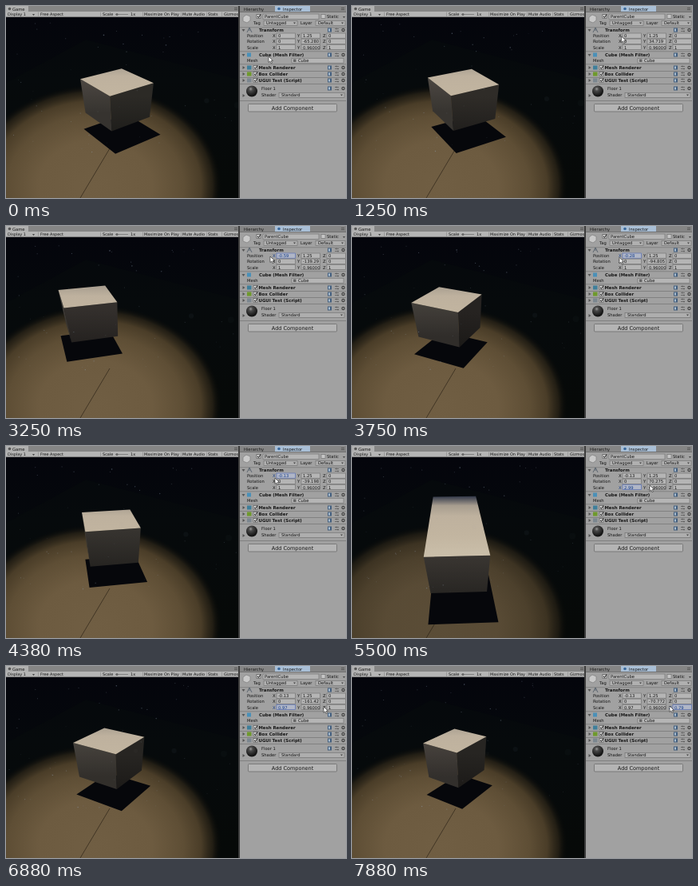
An HTML page with a canvas for the animation above (8000 ms loop, 426 by 240 pixels).

```html
<!DOCTYPE html>
<html lang="en">
<head>
<meta charset="utf-8">
<title>Cube inspector</title>
<style>
html, body { margin: 0; width: 100%; height: 100%; overflow: hidden; background: #05070b; }
canvas, svg { position: absolute; left: 0; top: 0; width: 426px; height: 240px; display: block; }
text { font-family: "DejaVu Sans", sans-serif; white-space: pre; }
</style>
</head>
<body>
<canvas id="view" width="426" height="240"></canvas>
<svg id="ui" viewBox="0 0 426 240"></svg>
<script>
const LOOP = 8000, STEP = 125;
const ctx = document.getElementById('view').getContext('2d');
const ui = document.getElementById('ui');

// Piecewise linear tracks: [time, value]
const tracks = {
  axis: [[0, 37], [1250, -60], [3250, -254], [4375, -350], [5500, -447], [6875, -573], [7875, -665], [8000, -676]],
  yaw: [[0, -65.28], [1250, 34.719], [3250, 220.71], [4375, 320.802], [5500, 430.275], [6875, 558.58], [7875, 649.228], [8000, 660.5]],
  pos: [[1500, 0], [3250, -.59], [4000, -.13]],
  sx: [[4625, 1], [5500, 2.99], [6250, .97]],
  sz: [[7000, 1], [7875, .79]],
  curX: [[0, 329], [500, 329], [1125, 340], [1500, 333], [3250, 331], [4000, 337], [4375, 337], [4625, 334], [5500, 373], [6250, 352], [6750, 398], [7875, 398]],
  curY: [[0, 63], [500, 63], [1125, 38], [3250, 38], [4000, 40], [4375, 40], [4625, 50], [5500, 49], [6250, 49], [6750, 51], [7875, 50]]
};

function at(name, t) {
  const keys = tracks[name];
  if (t <= keys[0][0]) return keys[0][1];
  for (let i = 1; i < keys.length; i++) {
    const [t0, a] = keys[i - 1], [t1, b] = keys[i];
    if (t <= t1) return a + (b - a) * (t - t0) / (t1 - t0);
  }
  return keys[keys.length - 1][1];
}

function seeded(seed) {
  return () => (seed = (seed * 16807) % 2147483647) / 2147483647;
}

// Camera: depth below the eye, sideways and forward distance to screen
const UNIT = .365, TOP = 1, BASE = 1.44, FLOOR = 1.796;
const COS = .778, SIN = .628;
function project([x, z], drop) {
  const depth = z * COS + drop * SIN;
  const up = z * SIN - drop * COS;
  return [146 + 345 * x / depth, 127 - 244 * up / depth];
}

// Shadows spread away from the point below the lamp
const LAMP = [-.14, 1.42], SPREAD = 1.35;
const cast = p => p.map((v, i) => LAMP[i] + SPREAD * (v - LAMP[i]));

function poly(points, fill) {
  ctx.beginPath();
  points.forEach(p => ctx.lineTo(p[0], p[1]));
  ctx.closePath();
  ctx.fillStyle = fill;
  ctx.fill();
}

function ramp(y0, y1, stops) {
  const g = ctx.createLinearGradient(0, y0, 0, y1);
  stops.forEach(([o, c]) => g.addColorStop(o, c));
  return g;
}

const rnd = seeded(4127);
const specks = (count, r, size, alpha, speed) => Array.from({ length: count }, () => ({
  x: rnd() * 292, y: 20 + rnd() * 165, r: r + rnd() * size, a: alpha * (.3 + rnd()),
  vx: (rnd() - .5) * speed, vy: (rnd() - .5) * speed * .6
}));
const dust = [...specks(50, .35, .55, .33, 9), ...specks(3, 2.5, 3, .05, 16)];

function drawFloor(dim) {
  ctx.fillStyle = ramp(14, 240, [[0, '#04050c'], [.35, '#05080c'], [1, '#050706']]);
  ctx.fillRect(0, 14, 292, 226);
  poly([[0, 96], [100, 42], [292, 92], [292, 240], [0, 240]], 'rgba(10,17,15,.25)');
  ctx.save();
  ctx.globalAlpha = dim;
  ctx.translate(112, 225);
  ctx.scale(1, .8);
  const g = ctx.createRadialGradient(0, 0, 0, 0, 0, 158);
  [[0, '#705e43'], [.45, '#6d5b40'], [.7, '#5e4e35'], [.84, '#4a3d28'], [.93, '#2c2518c0'], [1, '#0a0a0800']]
    .forEach(([o, c]) => g.addColorStop(o, c));
  ctx.fillStyle = g;
  ctx.fillRect(-160, -160, 340, 340);
  ctx.restore();
  ctx.beginPath();
  ctx.moveTo(130, 178);
  ctx.lineTo(93, 240);
  ctx.strokeStyle = 'rgba(35,28,18,.6)';
  ctx.lineWidth = 1;
  ctx.stroke();
}

function drawCube(t) {
  const a = at('axis', t) * Math.PI / 180;
  const p = at('pos', t) * UNIT;
  const cx = -.0427 + p * 1.02, cz = 1.655 - p * .47;
  const hx = at('sx', t) * UNIT / 2, hz = at('sz', t) * UNIT / 2;
  const ca = Math.cos(a), sa = Math.sin(a);
  const c = [[-1, -1], [1, -1], [1, 1], [-1, 1]].map(([i, j]) => [
    cx + i * hx * ca - j * hz * sa,
    cz + i * hx * sa + j * hz * ca
  ]);

  poly(c.map(q => project(cast(q), FLOOR)), '#06070b');

  for (let i = 0; i < 4; i++) {
    const A = c[i], B = c[(i + 1) % 4];
    const mx = (A[0] + B[0]) / 2, mz = (A[1] + B[1]) / 2;
    let nx = B[1] - A[1], nz = A[0] - B[0];
    const len = Math.hypot(nx, nz);
    nx /= len; nz /= len;
    if (nx * mx + nz * mz >= 0) continue;
    const v = 52 - 20 * nx;
    const tone = k => `rgb(${v * k | 0},${v * k * .94 | 0},${v * k * .87 | 0})`;
    const quad = [project(A, TOP), project(B, TOP), project(B, BASE), project(A, BASE)];
    poly(quad, ramp(quad[0][1], quad[3][1], [[0, tone(1.12)], [1, tone(.8)]]));
  }
  poly(c.map(q => project(q, TOP)),
    ramp(63, 145, [[0, '#343a4a'], [.14, '#a79d8f'], [.3, '#beb19e'], [.6, '#c2b5a0'], [1, '#cdc2ad']]));
}

function drawDust(t) {
  const s = t / 1000;
  for (const d of dust) {
    const x = (d.x + d.vx * s + 292) % 292, y = d.y + d.vy * s;
    ctx.beginPath();
    ctx.arc(x, Math.max(15, y), d.r, 0, 7);
    ctx.fillStyle = `rgba(150,165,185,${d.a})`;
    ctx.fill();
  }
}

// Interface
function add(tag, attrs, content) {
  const el = document.createElementNS('http://www.w3.org/2000/svg', tag);
  for (const k in attrs) el.setAttribute(k, attrs[k]);
  if (content !== undefined) el.textContent = content;
  ui.appendChild(el);
  return el;
}
const box = (x, y, width, height, fill, more) => add('rect', { x, y, width, height, fill, ...more });
const label = (x, y, s, size = 5.2, more) => add('text', { x, y, 'font-size': size, fill: '#151515', ...more }, s);
const bold = (x, y, s) => label(x, y, s, 5.4, { 'font-weight': 700 });
const frame = { stroke: '#6d6d6d', 'stroke-width': .6 };
const rule = y => box(293, y, 133, .7, '#747474');
const drop = (x, y) => add('path', { d: `M${x} ${y}h3l-1.500 2z`, fill: '#444' });
const menu = x => add('path', { d: `M${x} 2.500h4M${x} 4.500h4`, stroke: '#444', 'stroke-width': .7 });
const fold = (y, open) => add('path', {
  d: open ? `M295.500 ${y - 1}h4l-2 3z` : `M296.500 ${y - 2}v4l3-2z`, fill: '#555'
});
const check = (x, y) => {
  box(x, y, 5, 5, '#c6c6c6', { stroke: '#555', 'stroke-width': .6 });
  add('path', { d: `M${x + 1} ${y + 2.5}l1.500 1.500l2.500 -4`, stroke: '#222', fill: 'none' });
};
function tools(y) {
  box(403, y - 2.5, 5, 5, '#45607f');
  box(404, y - 1.5, 2, 3, '#a9bdd0');
  add('path', { d: `M412 ${y - 1.5}h5M412 ${y + 1.5}h5M414 ${y - 2.5}v2M416 ${y + .5}v2`, stroke: '#555', 'stroke-width': .7 });
  add('circle', { cx: 422.5, cy: y, r: 1.6, fill: 'none', stroke: '#444', 'stroke-width': 1.2 });
}

// Game tab and toolbar
box(0, 0, 292, 7, '#858585');
box(0, 0, 28, 7, '#b0b0b0');
add('circle', { cx: 4.5, cy: 3.5, r: 1.8, fill: '#555' });
label(8, 5.7, 'Game');
menu(286);
box(0, 7, 292, 7, '#b5b5b5');
box(0, 13.4, 292, .7, '#606060');
[[2, 'Display 1'], [43, 'Free Aspect'], [121, 'Scale'], [156, '1x'], [173, 'Maximize On Play'],
 [221, 'Mute Audio'], [253, 'Stats'], [273, 'Gizmos']].forEach(([x, s]) => label(x, 12.3, s, 4.95));
[40, 118, 171, 219, 251, 270].forEach(x => box(x, 7.5, .6, 6, '#8a8a8a'));
drop(33, 10);
box(137, 10.2, 16, .8, '#777');
add('circle', { cx: 139, cy: 10.6, r: 1.5, fill: '#666' });

// Inspector
box(291, 0, 2, 240, '#3c3c3c');
box(293, 0, 133, 240, '#a1a1a1');
box(293, 0, 133, 7, '#858585');
box(337, 0, 44, 7, '#a9bfd6');
label(298, 5.6, 'Hierarchy');
add('circle', { cx: 342, cy: 3.5, r: 1.8, fill: '#3b6a9c' });
label(347, 5.6, 'Inspector');
menu(420);
box(293, 7, 133, 1, '#707070');

add('path', { d: 'M297 14l4-3l5 2v5l-4 3l-5-2z', fill: '#c9c9c9', stroke: '#777', 'stroke-width': .6 });
check(314, 10.5);
box(322, 10, 70, 6.5, '#b5b5b5', frame);
label(324, 15.2, 'ParentCube');
box(395, 10.5, 5, 5, '#c6c6c6', frame);
label(402, 15.2, 'Static');
drop(422, 13);
label(310, 23.2, 'Tag');
box(323, 18.5, 42, 6, '#b0b0b0', frame);
label(326, 23.2, 'Untagged');
drop(360, 20.5);
label(369, 23.2, 'Layer');
box(388, 18.5, 37, 6, '#b0b0b0', frame);
label(391, 23.2, 'Default');
drop(420, 20.5);
rule(26.5);

fold(30, true);
add('path', { d: 'M302 33l3-6l3 6M305 27v4', stroke: '#5d6670', fill: 'none' });
bold(317, 32.4, 'Transform');
tools(30);

const fields = {};
['Position', 'Rotation', 'Scale'].forEach((name, row) => {
  const y = 39.3 + row * 7.1;
  label(302, y, name);
  [['X', 334], ['Y', 365], ['Z', 397]].forEach(([axis, x]) => {
    const tag = label(x, y, axis);
    const rect = box(x + 5, y - 5.3, 23.5, 6.2, '#b5b5b5', frame);
    const text = label(x + 7, y, '0');
    fields[name[0] + axis] = { tag, rect, text };
  });
});
rule(56.5);

fold(61, true);
box(302, 58.5, 5, 5, '#4a90b8');
bold(317, 63.3, 'Cube (Mesh Filter)');
tools(61);
label(302, 70.3, 'Mesh');
box(358, 65.2, 65, 6, '#b5b5b5', frame);
box(360, 66.5, 3.5, 3.5, '#666');
label(366, 70.3, 'Cube');
rule(72.5);

[[77, 'Mesh Renderer', '#3f7f9b'], [85, 'Box Collider', '#6f9a2c'], [93, 'UGUI Test (Script)', '#7c8790']]
  .forEach(([y, name, color]) => {
    fold(y, false);
    box(302, y - 2.5, 5.5, 5, color);
    check(310, y - 2.5);
    bold(316.5, y + 2.1, name);
    tools(y);
    rule(y + 4);
  });

const ball = add('radialGradient', { id: 'ball', cx: '.4', cy: '.3', r: '.6' });
[['0', '#9a9a9a'], ['.3', '#494949'], ['1', '#151515']].forEach(([offset, color]) => {
  ball.appendChild(add('stop', { offset, 'stop-color': color }));
});
add('circle', { cx: 308, cy: 106.5, r: 7, fill: 'url(#ball)' });
label(320, 105.3, 'Floor 1');
tools(103);
fold(112, false);
label(320, 113.3, 'Shader');
box(342, 108.3, 82, 6, '#aeaeae', frame);
label(345, 113.2, 'Standard');
drop(419, 110.5);
rule(118);
box(303.5, 122.5, 111, 9.5, '#b4b4b4', { rx: 1, stroke: '#666', 'stroke-width': .7 });
label(359, 129.7, 'Add Component', 6.5, { 'text-anchor': 'middle' });

const cursor = add('path', {
  d: 'M0 0v7.500l1.800-1.600l1.300 2.800l1.300-.6l-1.300-2.700h2.400z',
  fill: '#fff', stroke: '#222', 'stroke-width': .6
});

function activeField(t) {
  if (t < 1500) return '';
  if (t < 4500) return 'PX';
  return t < 6950 ? 'SX' : 'SZ';
}

const short = v => String(+v.toFixed(2));
function updatePanel(t) {
  const yaw = ((at('yaw', t) + 180) % 360 + 360) % 360 - 180;
  const values = {
    PX: short(at('pos', t)), PY: '1.25', PZ: '0',
    RX: '0', RY: yaw.toPrecision(5).slice(0, 7), RZ: '0',
    SX: short(at('sx', t)), SY: '0.96000', SZ: short(at('sz', t))
  };
  const active = activeField(t);
  for (const key in fields) {
    const f = fields[key], on = key === active;
    f.text.textContent = values[key];
    f.text.setAttribute('fill', on ? '#173f8c' : '#151515');
    f.tag.setAttribute('fill', on ? '#173f8c' : '#151515');
    f.rect.setAttribute('fill', on ? '#b0b6c6' : '#b5b5b5');
    f.rect.setAttribute('stroke', on ? '#4d68b8' : '#6d6d6d');
  }
  cursor.setAttribute('transform', `translate(${at('curX', t)} ${at('curY', t)})`);
}

function draw(now) {
  const t = Math.floor((now % LOOP) / STEP) * STEP;
  ctx.clearRect(0, 0, 426, 240);
  drawFloor(1 - .1 * Math.max(0, at('sx', t) - 1));
  drawCube(t);
  drawDust(t);
  updatePanel(t);
}

const start = performance.now();
function tick() {
  draw(performance.now() - start);
  requestAnimationFrame(tick);
}
tick();
</script>
</body>
</html>
```
